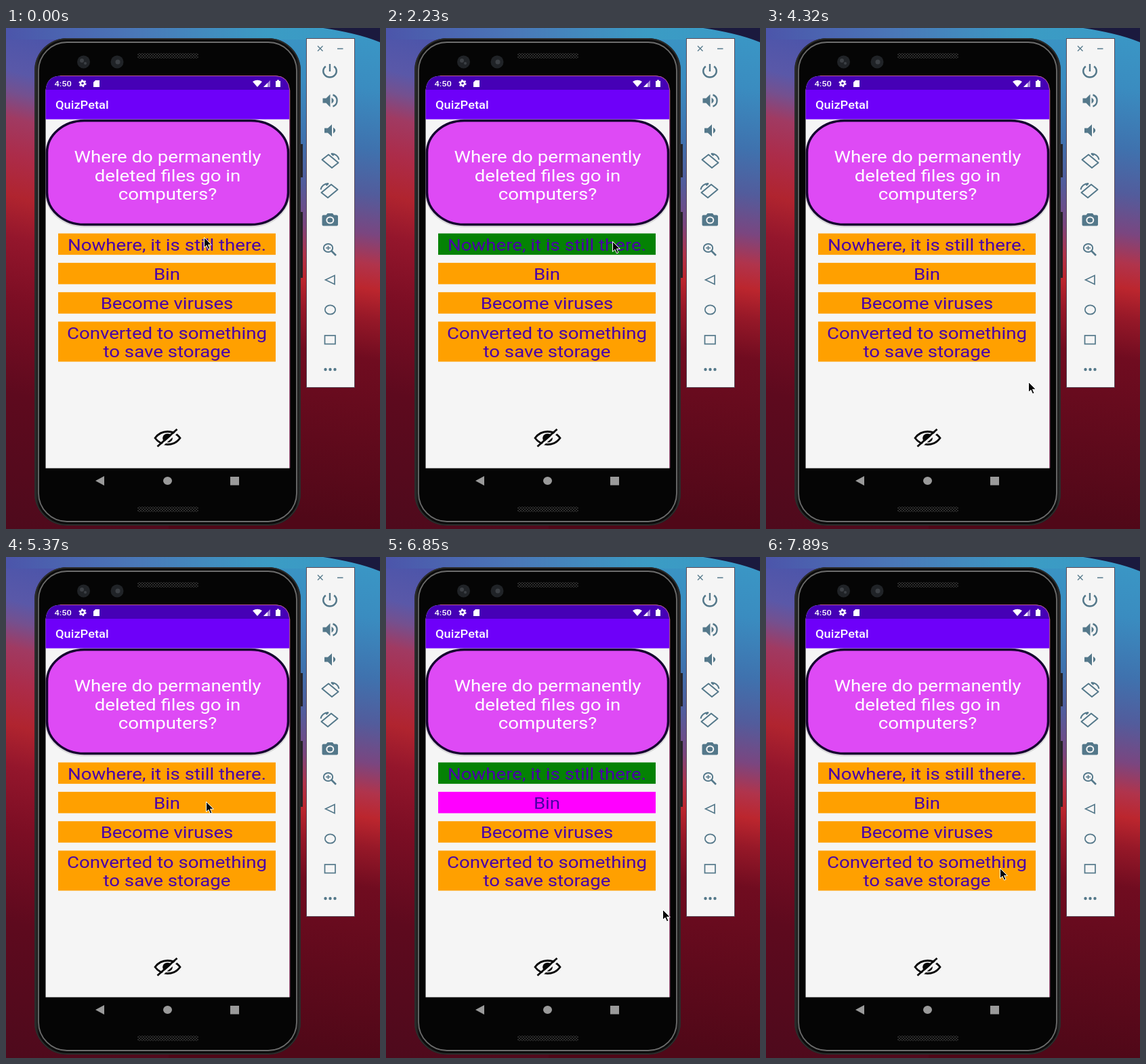
An HTML page for the animation above (8000 ms loop, 552 by 738 pixels).

```html
<!DOCTYPE html>
<html lang="en">
<head>
<meta charset="utf-8">
<title>Quiz app</title>
<style>
html, body { margin: 0; width: 100%; height: 100%; overflow: hidden; background: #5c0a1c; }
svg { display: block; width: 552px; height: 738px; font-family: Roboto, Arial, sans-serif; }
.big { font-size: 23.55px; text-anchor: middle; }
.line { fill: none; stroke: #54788a; stroke-width: 2; }
</style>
</head>
<body>
<svg viewBox="0 0 552 738">
  <defs>
    <linearGradient id="left" gradientUnits="userSpaceOnUse" x1="0" y1="0" x2="-180" y2="720">
      <stop offset="0" stop-color="#4c55aa"/><stop offset=".08" stop-color="#5a58a8"/>
      <stop offset=".12" stop-color="#74508f"/><stop offset=".17" stop-color="#a03a62"/>
      <stop offset=".24" stop-color="#ac2c4a"/><stop offset=".32" stop-color="#b0242f"/>
      <stop offset=".4" stop-color="#94162c"/><stop offset=".52" stop-color="#7c0e24"/>
      <stop offset=".7" stop-color="#5e0a1e"/><stop offset="1" stop-color="#4c0a1c"/>
    </linearGradient>
    <linearGradient id="right" gradientUnits="userSpaceOnUse" x1="530" y1="0" x2="420" y2="720">
      <stop offset="0" stop-color="#3a98c6"/><stop offset=".12" stop-color="#3a8cc0"/>
      <stop offset=".24" stop-color="#3f72ae"/><stop offset=".33" stop-color="#525c9c"/>
      <stop offset=".41" stop-color="#7a4680"/><stop offset=".47" stop-color="#b0344c"/>
      <stop offset=".52" stop-color="#bc262e"/><stop offset=".58" stop-color="#961828"/>
      <stop offset=".66" stop-color="#700c20"/><stop offset="1" stop-color="#500818"/>
    </linearGradient>
    <linearGradient id="top">
      <stop offset="0" stop-color="#4c55aa"/><stop offset=".35" stop-color="#4a78b8"/>
      <stop offset=".7" stop-color="#3b9cc4"/><stop offset="1" stop-color="#3a98c6"/>
    </linearGradient>
    <linearGradient id="rim">
      <stop offset="0" stop-color="#353535"/><stop offset=".02" stop-color="#0c0c0c"/>
      <stop offset=".98" stop-color="#0c0c0c"/><stop offset="1" stop-color="#303030"/>
    </linearGradient>
    <pattern id="mesh" width="4" height="4" patternUnits="userSpaceOnUse">
      <path d="M0 0h2v2h-2zM2 2h2v2h-2z" fill="#2e2e2e"/>
    </pattern>
    <clipPath id="screen"><path d="M58.500 648.500V92Q60 71 80 70.500H398Q417 71 418.500 92V648.500z"/></clipPath>
  </defs>

  <rect width="240" height="738" fill="url(#left)"/>
  <rect x="240" width="312" height="738" fill="url(#right)"/>
  <rect width="552" height="17" fill="url(#top)"/>
  <path d="M468 0H552V21Q520 8 468 0z" fill="#1b1a3e"/>

  <!-- phone -->
  <path d="M434 171h4v49h-4zM434 271h4v97h-4z" fill="#242226"/>
  <rect x="42" y="15" width="393" height="718" rx="48" fill="url(#rim)"/>
  <rect x="43" y="16" width="391" height="716" rx="47" fill="none" stroke="#2b2b2b" stroke-width="2"/>
  <rect x="48" y="21" width="381" height="706" rx="42" fill="#050505" stroke="#6c6c6c" stroke-width="1.800"/>
  <rect x="194" y="37" width="90" height="8" rx="3" fill="url(#mesh)"/>
  <rect x="194" y="705" width="90" height="8" rx="3" fill="url(#mesh)"/>
  <g fill="#202327">
    <circle cx="114.500" cy="50" r="9.500"/><circle cx="164" cy="50" r="9.500"/>
    <g fill="#3c4045"><circle cx="112" cy="48" r="3"/><circle cx="117" cy="52" r="2"/><circle cx="165" cy="50" r="3.500"/></g>
  </g>

  <!-- app screen -->
  <g clip-path="url(#screen)">
    <rect x="58" y="70" width="361" height="579" fill="#f5f5f5"/>
    <rect x="58" y="70" width="361" height="21" fill="#4600b6"/>
    <rect x="58" y="91" width="361" height="43.500" fill="#6e00f9"/>
  </g>
  <path d="M80 70.500H398Q417 71 418.800 92V648" fill="none" stroke="#b8588c"/>
  <g fill="#fff">
    <text transform="translate(71.500 85.700) scale(1.17 1)" font-size="11" font-weight="500">4:50</text>
    <text transform="translate(73 118.700) scale(1.17 1)" font-size="15.600" font-weight="500">QuizPetal</text>
    <circle cx="113" cy="81.500" r="3" fill="none" stroke="#fff" stroke-width="2.400"/>
    <circle cx="113" cy="81.500" r="4.800" fill="none" stroke="#fff" stroke-width="1.600" stroke-dasharray="2.500 2.527"/>
    <path d="M132 77h6v10h-9v-7z"/>
    <path d="M364 79Q371 74.500 378 79L371 87z"/>
    <path d="M380 87L390 77V87z" opacity=".5"/><path d="M380 87L386 81V87z"/>
    <path d="M398 78h2v-1.500h3V78h2v9h-7z"/>
  </g>
  <rect x="60" y="138" width="357" height="153.500" rx="55" ry="47" fill="none" stroke="#000" stroke-opacity=".12" stroke-width="4"/>
  <rect x="60.500" y="136.500" width="356" height="153" rx="55" ry="47" fill="#de4af5" stroke="#160430" stroke-width="3.500"/>
  <g id="question" fill="#fff"></g>
  <g id="options" fill="#4a00a8"></g>

  <g fill="none" stroke="#080808" stroke-width="2.800">
    <path d="M220 604Q227 594.500 238.500 594.500T257 604Q250 613.500 238.500 613.500T220 604z"/>
    <ellipse cx="238.500" cy="604" rx="6" ry="5.200" fill="#080808"/>
    <path d="M226 618.500L255 593" stroke="#f5f5f5" stroke-width="3"/>
    <path d="M223.500 616.500L252.500 591"/>
  </g>
  <g fill="#9a9a9a">
    <path d="M132 667L145 660V674z"/><ellipse cx="238.500" cy="667" rx="6.500" ry="6"/><path d="M331 661h13v12.500h-13z"/>
  </g>

  <!-- emulator toolbar -->
  <rect x="443.500" y="15.500" width="71" height="514" fill="#f5f5f5" stroke="#5a4a58"/>
  <g class="line">
    <path d="M460 26.500l7.500 7.500M467.500 26.500l-7.500 7.500M489 30.500h8.500" stroke-width="1.300"/>
    <path d="M478 53v11M471.800 56.500A9.800 9 0 1 0 484.200 56.500" stroke-width="2.400"/>
    <path d="M482.500 98.500A9 9 0 0 1 482.500 115.500" stroke-width="2.400"/>
    <g id="turn">
      <path d="M-12 -1.500L-2.500 -9L12 3L2.500 10.500z" stroke-linejoin="round"/>
      <path d="M1.500 -10.500Q11 -10 13 -1.500M1.500 -10.500L5 -7.500"/>
    </g>
    <ellipse cx="475.500" cy="324" rx="6.700" ry="6"/>
    <path d="M472 324h7M475.500 321v6" stroke-width="1.500"/>
    <path d="M480.500 328.500L487 335" stroke-width="2.600"/>
    <path d="M471.500 371L485 364.500V377.500z" stroke-width="1.700"/>
    <ellipse cx="478.500" cy="415" rx="7.700" ry="6.700" stroke-width="1.700"/>
    <rect x="470.500" y="453" width="15.500" height="12.500" stroke-width="1.700"/>
  </g>
  <g fill="#54788a">
    <path d="M467.500 103.500h5l6-6v19l-6-6h-5zM480.500 102.500Q487 107 480.500 111.500z"/>
    <path d="M470 147.500h5l6-5.500v18l-6-5.500h-5zM483 146.500Q489.500 151 483 155.500z"/>
    <path d="M474.500 273h7.500l2 2.500h4q2 0 2 2v12q0 2-2 2h-19.500q-2 0-2-2v-12q0-2 2-2h4z"/>
    <ellipse cx="478.300" cy="283" rx="5" ry="4.500" fill="#54788a" stroke="#f5f5f5" stroke-width="2"/>
    <circle cx="471.500" cy="503" r="2.200"/><circle cx="478.500" cy="503" r="2.200"/><circle cx="485.500" cy="503" r="2.200"/>
  </g>

  <path id="cursor" d="M.5 .5V15.500L4 12.300L6.500 18L9 17L6.500 11.300H11.300z" fill="#050505" stroke="#fff" stroke-width="1"/>
</svg>

<script>
const LOOP = 8000;
const ORANGE = '#ffa000', GREEN = '#048204', PINK = '#ff00ff';
const $ = id => document.getElementById(id);

function add(parent, tag, attrs, text = '') {
  const el = document.createElementNS('http://www.w3.org/2000/svg', tag);
  for (const k in attrs) el.setAttribute(k, attrs[k]);
  el.textContent = text;
  return parent.appendChild(el);
}

// The device screen is shown wider than it is tall, so all its text is scaled alike.
const bigText = (parent, x, y, lines) => lines.forEach((s, i) =>
  add(parent, 'text', { class: 'big', transform: `translate(${x} ${y + i * 27.6}) scale(1.174 1)` }, s));

bigText($('question'), 238.5, 198, ['Where do permanently', 'deleted files go in', 'computers?']);

const bars = [
  ['Nowhere, it is still there.'],
  ['Bin'],
  ['Become viruses'],
  ['Converted to something', 'to save storage']
].map((lines, i) => {
  const y = 302.6 + 43.3 * i;
  const bar = add($('options'), 'rect', { x: 77, y, width: 321, height: 31.5 + 27.5 * (lines.length - 1), fill: ORANGE });
  bigText($('options'), 237.5, y + 25.2, lines);
  return bar;
});

const turn = $('turn');
turn.after(turn.cloneNode(true));
turn.setAttribute('transform', 'translate(478.500 195.500)');
turn.nextSibling.setAttribute('transform', 'translate(477.500 239.500) scale(-1 1)');

// Pointer moves: first step, last step, then the place at each evenly timed step.
const moves = [
  [0, 0, [292, 308]],
  [150, 1190, [296, 290], [302, 250], [308, 223], [313, 226], [320, 255], [329, 290], [335, 311], [334, 314]],
  [3580, 4320, [333, 322], [340, 385], [358, 475], [381, 550], [393, 564], [387, 521]],
  [4920, 5370, [368, 487], [332, 424], [304, 373], [295, 360]],
  [6410, 6850, [304, 373], [343, 432], [390, 502], [408, 519]],
  [7600, 7890, [380, 487], [352, 451], [345, 458]]
];

function pointer(t) {
  const [start, end, ...steps] = moves.findLast(m => t >= m[0]);
  const gap = (end - start) / (steps.length - 1) || 1;
  return steps[Math.min(steps.length - 1, Math.floor((t - start + 2) / gap))];
}

const within = (t, a, b) => t >= a && t < b;

function draw(now) {
  const t = now % LOOP;
  const wrong = within(t, 5820, 7150);
  bars[0].setAttribute('fill', wrong || within(t, 2230, 4170) ? GREEN : ORANGE);
  bars[1].setAttribute('fill', wrong ? PINK : ORANGE);
  $('cursor').setAttribute('transform', `translate(${pointer(t)})`);
  requestAnimationFrame(draw);
}
draw(0);
</script>
</body>
</html>
```
